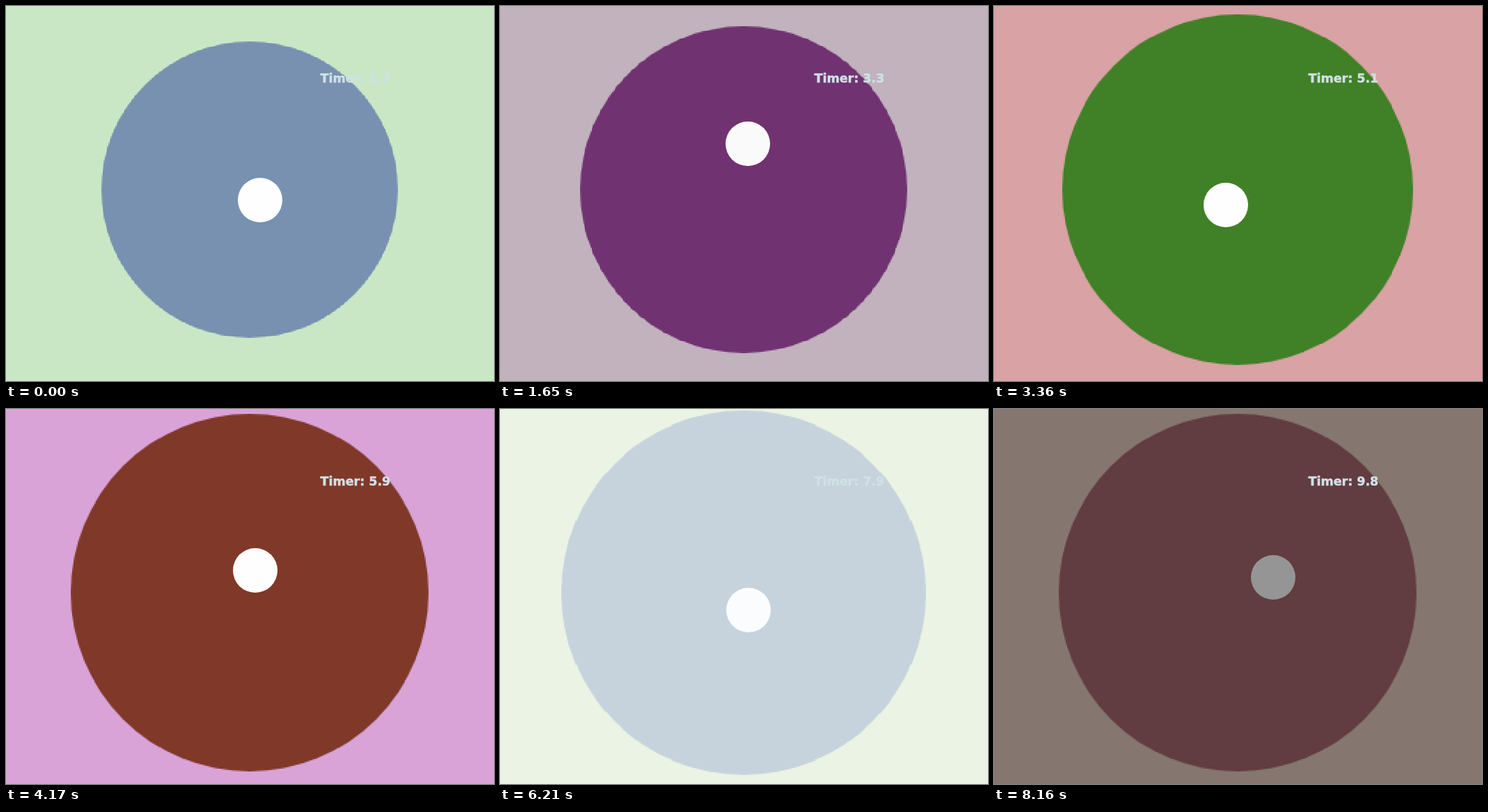
These frames come from a looping animation (701 px wide and 539 px high, 8.25 s). An HTML page with a canvas:

```html
<!DOCTYPE html>
<html lang="en">
<head>
<meta charset="utf-8">
<title>Timer</title>
<style>
  html, body { margin: 0; width: 100%; height: 100%; overflow: hidden; }
  #stage { position: relative; width: 701px; height: 539px; overflow: hidden; }
  #disc, svg { position: absolute; display: block; }
  #disc { image-rendering: pixelated; }
  svg { left: 0; top: 0; width: 701px; height: 539px; }
  text {
    font: bold 17.5px "DejaVu Sans", sans-serif;
    fill: #d0e0e6; stroke: #d0e0e6; stroke-width: 0.5px;
  }
</style>
</head>
<body>
<div id="stage">
  <canvas id="disc" width="256" height="256"></canvas>
  <svg viewBox="0 0 701 539">
    <circle id="ball" r="32"/>
    <text id="label" x="451.5" y="110"></text>
  </svg>
</div>
<script>
const LOOP = 8250, STEP = 30, LAST = 8160;
const BEAT = 1020, FIRST_BEAT = 85;
const CENTER_X = 350, CENTER_Y = 264;
const [stage, disc, ball, label] =
  ['stage', 'disc', 'ball', 'label'].map(id => document.getElementById(id));
const sprite = disc.getContext('2d');

// Background, disc and ball colours, one set per beat.
const themes = [
  ['#c9e7c5', '#7891b0', '#fefefe'],
  ['#a8c1d5', '#8b3f62', '#f5f5f5'],
  ['#c1b2be', '#713271', '#fafafa'],
  ['#daa3a7', '#58257f', '#fdfdfd'],
  ['#d9a2a4', '#408027', '#fefefe'],
  ['#d9a3d8', '#803828', '#fefefe'],
  ['#e1cbde', '#a3857f', '#fefefe'],
  ['#ebf4e4', '#c6d3dc', '#fafcfd'],
  ['#857770', '#613c40', '#959595']
];

// Ball path: time, x, y.
const path = [
  [0, 365, 279], [810, 335, 188], [2430, 374, 230], [3360, 333, 286],
  [4170, 358, 232], [6210, 357, 289], [8160, 401, 242]
];

function slope(i, axis) {
  const a = path[Math.max(i - 1, 0)], b = path[Math.min(i + 1, path.length - 1)];
  return (b[axis] - a[axis]) / (b[0] - a[0]);
}

function along(t, axis) {
  let i = 0;
  while (i < path.length - 2 && t >= path[i + 1][0]) i++;
  const a = path[i], b = path[i + 1], span = b[0] - a[0];
  const u = (t - a[0]) / span, v = 1 - u;
  return v * v * (1 + 2 * u) * a[axis] + u * u * (3 - 2 * u) * b[axis]
    + u * v * span * (v * slope(i, axis) - u * slope(i + 1, axis));
}

// The disc is a small sprite, enlarged without smoothing.
function drawDisc(color, radius) {
  sprite.clearRect(0, 0, 256, 256);
  sprite.fillStyle = color;
  sprite.beginPath();
  sprite.arc(128, 128, 128, 0, 2 * Math.PI);
  sprite.fill();
  disc.style.left = CENTER_X - radius + 'px';
  disc.style.top = CENTER_Y - radius + 'px';
  disc.style.width = disc.style.height = 2 * radius + 'px';
}

function draw(time) {
  const t = Math.min(Math.floor(time % LOOP / STEP) * STEP, LAST);
  const beat = Math.floor((t - FIRST_BEAT) / BEAT) + 1;
  const [backColor, discColor, ballColor] = themes[beat];
  const swell = Math.cos(0.15 * (t / 1000 - 6.165));

  stage.style.background = backColor;
  drawDisc(discColor, Math.ceil(137.85 + 124 * swell));
  ball.setAttribute('fill', ballColor);
  ball.setAttribute('cx', Math.round(along(t, 1)));
  ball.setAttribute('cy', Math.round(along(t, 2)));
  label.textContent = 'Timer: ' + (1.692 + 0.0009995 * t).toFixed(1);
}

const start = performance.now();
function tick() {
  draw(performance.now() - start);
  requestAnimationFrame(tick);
}
tick();
</script>
</body>
</html>
```
